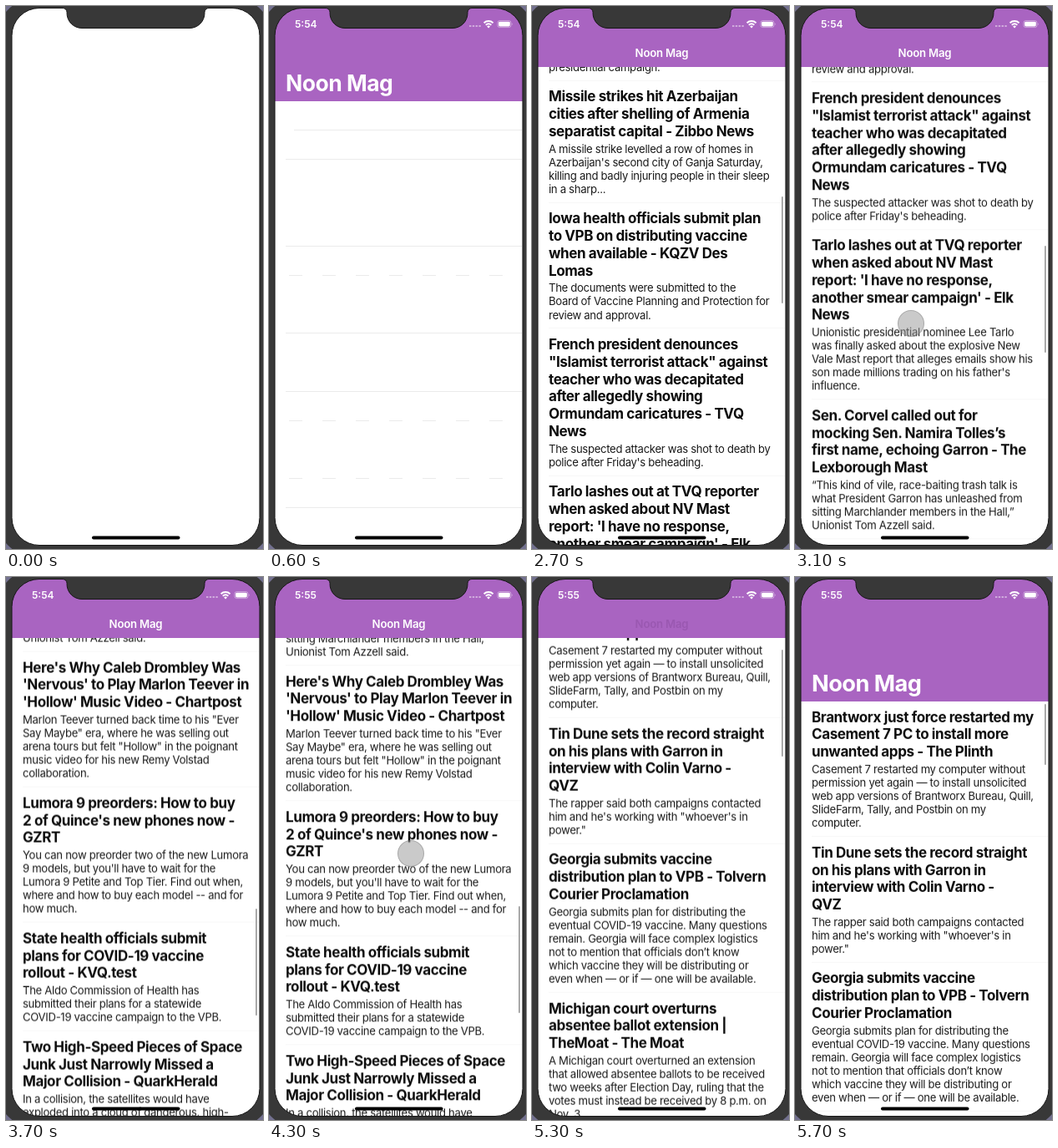
Write an HTML page that moves like this. It is 308 by 650 pixels and loops after 5800 ms.

```html
<!DOCTYPE html>
<html lang="en">
<head>
<meta charset="utf-8">
<title>News reader</title>
<style>
html, body { margin: 0; width: 100%; height: 100%; overflow: hidden; background: #fff; }
body { position: relative; font-family: Inter, "Liberation Sans", sans-serif; color: #0c0c0c; }
div, svg { position: absolute; }
#stage { left: 0; top: 0; width: 308px; height: 650px; overflow: hidden; background: #fff; }
#list { left: 20px; top: 113.7px; width: 283px; will-change: transform; }
article { padding: 8.7px 0 7.85px; border-bottom: 1px solid #f7f7f7; }
h2, p { margin: 0; white-space: pre; }
h2 { font-size: 17px; font-weight: 700; line-height: 20.77px; letter-spacing: -.4px; }
p { margin-top: 2px; font-size: 13.1px; line-height: 16.04px; letter-spacing: -.3px; color: #1a1a1a; }
#header { left: 0; top: 0; width: 308px; background: #a964c1; color: #fff; }
#clip { left: 0; right: 0; top: 73px; bottom: 0; overflow: hidden; }
#big { left: 20px; bottom: 6px; font-size: 26.5px; font-weight: 700; line-height: 32px; letter-spacing: -.5px; white-space: pre; transform-origin: 0 50%; }
#small { left: 0; width: 311px; top: 46px; line-height: 20px; text-align: center; font-size: 13.2px; font-weight: 600; letter-spacing: -.2px; }
#clock { left: 31px; top: 12px; line-height: 20px; font-size: 12px; font-weight: 600; color: #fff; }
#bar { left: 298.5px; width: 2.5px; border-radius: 2px; background: #a9a9a9; }
#touch { width: 30px; height: 30px; margin: -16px; border: 1px solid rgba(110,110,110,.35); border-radius: 50%; background: rgba(150,150,150,.5); }
svg { left: 0; top: 0; }
</style>
</head>
<body>
<div id="stage">
  <svg id="blank" width="308" height="650" stroke="#ebebeb"></svg>
  <div id="list"></div>
  <div id="bar"></div>
  <div id="touch"></div>
  <div id="header">
    <div id="clip"><div id="big">Noon Mag</div></div>
    <div id="small">Noon Mag</div>
  </div>
  <div id="clock"></div>
  <svg width="308" height="650">
    <g fill="#fff">
      <path d="M240 24h14" stroke="#fff" stroke-opacity=".45" stroke-width="2" stroke-dasharray="2.4 1.4"/>
      <g fill="none" stroke="#fff" stroke-width="1.9">
        <path d="M257.6 20.2a8 8 0 0 1 11 0M259.8 22.7a5 5 0 0 1 6.6 0"/>
      </g>
      <path d="M263.1 26.4l-1.9-2a2.8 2.8 0 0 1 3.8 0z"/>
      <rect x="274" y="17.6" width="16" height="8" rx="2.4" fill="none" stroke="#fff" stroke-opacity=".5" stroke-width=".8"/>
      <rect x="275.2" y="18.8" width="13.6" height="5.6" rx="1.4"/>
      <path d="M291 20.2q1.4 1.4 0 2.8z" opacity=".6"/>
    </g>
    <path id="bezel" fill="#383838" fill-rule="evenodd" stroke="#161616"/>
    <path fill="#73718f" fill-rule="evenodd" d="M0 0H308V650H0zM34-9H274a44 44 0 0 1 44 44V615a44 44 0 0 1-44 44H34a44 44 0 0 1-44-44V35a44 44 0 0 1 44-44z"/>
    <rect x="103" y="634.6" width="105.5" height="3.8" rx="1.9"/>
  </svg>
</div>
<script>
const $ = id => document.getElementById(id);
const clamp = (v, a = 0, b = 1) => Math.min(b, Math.max(a, v));

// Lines starting with # belong to the headline; blank lines split stories.
const stories = `# Brantworx just force restarted my
# Casement 7 PC to install more
# unwanted apps - The Plinth
Casement 7 restarted my computer without
permission yet again — to install unsolicited
web app versions of Brantworx Bureau, Quill,
SlideFarm, Tally, and Postbin on my
computer.

# Tin Dune sets the record straight
# on his plans with Garron in
# interview with Colin Varno -
# QVZ
The rapper said both campaigns contacted
him and he's working with "whoever's in
power."

# Georgia submits vaccine
# distribution plan to VPB - Tolvern
# Courier Proclamation
Georgia submits plan for distributing the
eventual COVID-19 vaccine. Many questions
remain. Georgia will face complex logistics
not to mention that officials don’t know
which vaccine they will be distributing or
even when — or if — one will be available.

# Michigan court overturns
# absentee ballot extension |
# TheMoat - The Moat
A Michigan court overturned an extension
that allowed absentee ballots to be received
two weeks after Election Day, ruling that the
votes must instead be received by 8 p.m. on
Nov. 3.

# Rap star files late papers and
# asks his fans to write him in
# with a video shared widely on
# social media - Elk News
Dane has spent nearly $6 million on his
presidential campaign.

# Missile strikes hit Azerbaijan
# cities after shelling of Armenia
# separatist capital - Zibbo News
A missile strike levelled a row of homes in
Azerbaijan's second city of Ganja Saturday,
killing and badly injuring people in their sleep
in a sharp...

# Iowa health officials submit plan
# to VPB on distributing vaccine
# when available - KQZV Des
# Lomas
The documents were submitted to the
Board of Vaccine Planning and Protection for
review and approval.

# French president denounces
# "Islamist terrorist attack" against
# teacher who was decapitated
# after allegedly showing
# Ormundam caricatures - TVQ
# News
The suspected attacker was shot to death by
police after Friday's beheading.

# Tarlo lashes out at TVQ reporter
# when asked about NV Mast
# report: 'I have no response,
# another smear campaign' - Elk
# News
Unionistic presidential nominee Lee Tarlo
was finally asked about the explosive New
Vale Mast report that alleges emails show his
son made millions trading on his father's
influence.

# Sen. Corvel called out for
# mocking Sen. Namira Tolles’s
# first name, echoing Garron - The
# Lexborough Mast
“This kind of vile, race-baiting trash talk is
what President Garron has unleashed from
sitting Marchlander members in the Hall,”
Unionist Tom Azzell said.

# Here's Why Caleb Drombley Was
# 'Nervous' to Play Marlon Teever in
# 'Hollow' Music Video - Chartpost
Marlon Teever turned back time to his "Ever
Say Maybe" era, where he was selling out
arena tours but felt "Hollow" in the poignant
music video for his new Remy Volstad
collaboration.

# Lumora 9 preorders: How to buy
# 2 of Quince's new phones now -
# GZRT
You can now preorder two of the new Lumora
9 models, but you'll have to wait for the
Lumora 9 Petite and Top Tier. Find out when,
where and how to buy each model -- and for
how much.

# State health officials submit
# plans for COVID-19 vaccine
# rollout - KVQ.test
The Aldo Commission of Health has
submitted their plans for a statewide
COVID-19 vaccine campaign to the VPB.

# Two High-Speed Pieces of Space
# Junk Just Narrowly Missed a
# Major Collision - QuarkHerald
In a collision, the satellites would have
exploded into a cloud of dangerous, high-
velocity debris circling the planet.

# Autumn storm brings early snow
# to the northern valleys
Forecasters expect more by the weekend.`;

function add(parent, tag, text = "") {
  const el = parent.appendChild(document.createElement(tag));
  el.textContent = text;
  return el;
}
for (const story of stories.split("\n\n")) {
  const row = add($("list"), "article"), lines = story.split("\n");
  add(row, "h2", lines.filter(s => s[0] === "#").map(s => s.slice(2)).join("\n"));
  add(row, "p", lines.filter(s => s[0] !== "#").join("\n"));
}

// Separators of the empty list
$("blank").innerHTML = [0, 1, 4, 5, 7, 9, 10, 12, 13].map(k => {
  const dash = [5, 10, 12].includes(k) ? ' stroke-dasharray="16 24" stroke-dashoffset="-4"' : "";
  return `<path d="M${k ? 20 : 30} ${Math.round(148.3 + 34.73 * k) + .5}H303"${dash}/>`;
}).join("");

$("bezel").setAttribute("d", "M-9-9H317V659H-9z" +
  "M40 2.5H68a5 5 0 0 1 5 5v1a18 18 0 0 0 18 18h129a18 18 0 0 0 18-18v-1a5 5 0 0 1 5-5" +
  "H271a33 33 0 0 1 33 33V612.5a33 33 0 0 1-33 33H40a33 33 0 0 1-33-33V35.5a33 33 0 0 1 33-33z");

// Scroll offset over time: [ms, px]
const keys = [[1950, 0], [2100, 40], [2200, 114], [2350, 290], [2600, 690], [2850, 960],
  [3000, 1062], [3100, 1106], [3250, 1250], [3450, 1480], [3700, 1655], [3950, 1712],
  [4150, 1720], [4300, 1640], [4450, 1330], [4600, 980], [4700, 840], [4800, 774],
  [4950, 610], [5150, 290], [5350, 60], [5500, -25], [5600, -45], [5700, -35], [5800, -15]];

function slope(i) {
  const a = keys[i - 1], b = keys[i + 1];
  return a && b ? (b[1] - a[1]) / (b[0] - a[0]) : 0;
}
function scrollAt(t) {
  if (t <= keys[0][0]) return 0;
  let i = 0;
  while (i < keys.length - 2 && t > keys[i + 1][0]) i++;
  const [t0, y0] = keys[i], [t1, y1] = keys[i + 1];
  const d = t1 - t0, u = (t - t0) / d, v = 1 - u;
  return y0 * v * v * (1 + 2 * u) + y1 * u * u * (1 + 2 * v)
    + d * u * v * (slope(i) * v - slope(i + 1) * u);
}

// Finger drags: [start, end, x, y + scroll]; the finger sticks to the content.
const drags = [[2000, 2350, 141, 490], [3030, 3250, 139, 1487],
  [4180, 4330, 170, 1970], [4720, 4950, 181, 1056]];

function draw(t) {
  const off = scrollAt(t), over = Math.min(0, off);
  const bottom = Math.max(73, 114 - off);

  $("blank").style.opacity = t >= 100 && t < 1100 ? 1 : 0;
  $("list").style.opacity = t < 1100 ? 0 : clamp(.6 + (t - 1100) / 500);
  $("list").style.transform = `translateY(${-off}px)`;

  $("header").style.opacity = t < 300 ? 0 : clamp((t - 200) / 400);
  $("header").style.height = bottom + "px";
  $("big").style.transform = `scale(${1 - over * .0007})`;
  const k = clamp((off - 114) / 150);
  const mix = [154, 88, 177].map(c => c + (255 - c) * k);
  $("small").style.color = `rgb(${mix})`;
  $("small").style.opacity = off > 100 ? 1 : 0;
  $("clock").textContent = t < 4200 ? "5:54" : "5:55";

  const early = clamp((2700 - t) / 500);
  const top = Math.max(bottom + 3, 74 + (off - 41) / 5 - 12 * early);
  $("bar").style.opacity = t < 2000 ? 0 : 1;
  $("bar").style.top = top + "px";
  $("bar").style.height = 128 + 13 * early + over * 1.57 + "px";

  const drag = drags.find(d => t >= d[0] && t < d[1]);
  $("touch").style.opacity = drag ? 1 : 0;
  if (drag) {
    $("touch").style.left = drag[2] + "px";
    $("touch").style.top = drag[3] - off + "px";
  }
}

const start = performance.now();
function tick() {
  draw((performance.now() - start) % 5800);
  requestAnimationFrame(tick);
}
tick();
</script>
</body>
</html>
```
